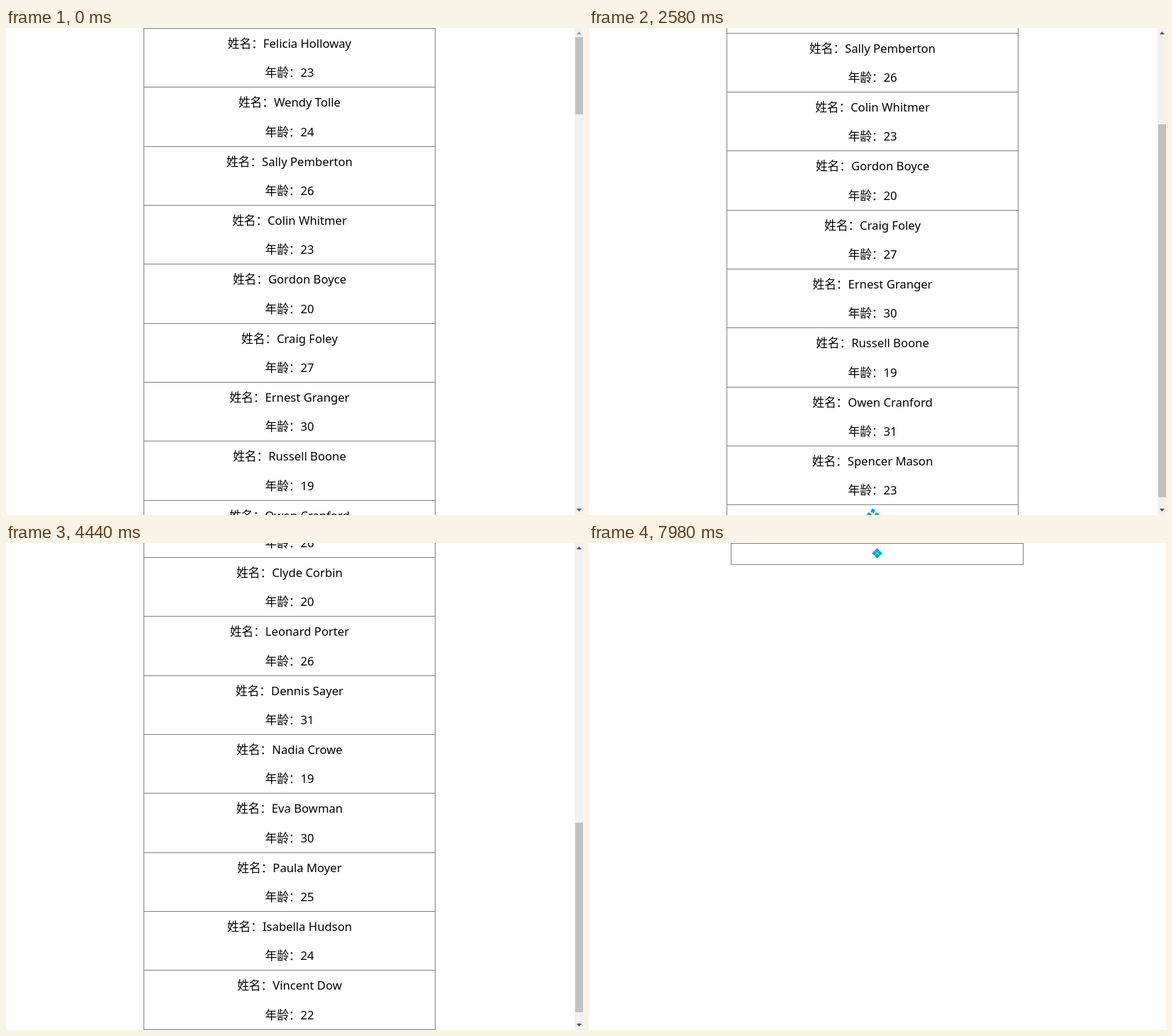
Recreate the animation shown at these times as an HTML page. Size 814 by 688 pixels, loop 8 s.

```html
<!DOCTYPE html>
<html lang="zh-CN">
<head>
<meta charset="utf-8">
<style>
html, body { margin: 0; width: 100%; height: 100%; overflow: hidden; background: #fff; }
body { position: relative; font: 16.67px/41.3px "Noto Sans", "Noto Sans CJK SC", "Noto Sans CJK", sans-serif; color: #000; }
div { box-sizing: border-box; position: absolute; }
.item, #loader { border: 1px solid #808080; }
.item { left: 194px; width: 412px; height: 84.33px; text-align: center; white-space: pre; }
#loader { height: 31px; overflow: hidden; }
#loader div { left: 50%; top: 13px; width: 5px; height: 5px; margin: -2.5px; background: #00a6d0; }
#bar { left: 802px; top: 0; width: 12px; height: 688px; background: #f1f1f1; }
#thumb { left: 1px; width: 11px; background: #c1c1c1; }
.arrow { left: 3px; width: 7px; height: 4px; background: #505050; }
#up { top: 5px; clip-path: polygon(50% 0, 100% 100%, 0 100%); }
#down { top: 679px; clip-path: polygon(0 0, 100% 0, 50% 100%); }
#status { left: 0; top: 670px; width: 269px; height: 18px; padding-left: 3px; background: #dee1e6;
  border: solid #c3c6cb; border-width: 1px 1px 0 0; border-top-right-radius: 3px;
  font-size: 9px; line-height: 17px; color: #5f6368; white-space: pre; }
</style>
</head>
<body>
<div id="list"></div>
<div id="loader"><div></div><div></div><div></div><div></div></div>
<div id="bar"><div id="thumb"></div><div class="arrow" id="up"></div><div class="arrow" id="down"></div></div>
<div id="status"></div>
<script>
const $ = id => document.getElementById(id);
const PITCH = 250 / 3, VIEW = 688, LOADER = 31.33, LOOP = 8000, STEP = 60;
const people = `Felicia Holloway 23,Wendy Tolle 24,Sally Pemberton 26,Colin Whitmer 23,Gordon Boyce 20,
Craig Foley 27,Ernest Granger 30,Russell Boone 19,Owen Cranford 31,Spencer Mason 23,
Gloria Stanhope 28,Roger Kimball 26,Clyde Corbin 20,Leonard Porter 26,Dennis Sayer 31,
Nadia Crowe 19,Eva Bowman 30,Paula Moyer 25,Isabella Hudson 24,Vincent Dow 22`.split(/,\s*/);

const items = people.map(person => {
  const el = document.createElement('div');
  const cut = person.lastIndexOf(' ');
  el.className = 'item';
  el.textContent = `姓名：${person.slice(0, cut)}\n年龄：${person.slice(cut + 1)}`;
  $('list').append(el);
  return el;
});
const squares = [...$('loader').children];

// [time, scroll offset]
const scrollKeys = [
  [2340, 0], [2400, 12], [2460, 60], [2520, 120], [2580, 160], [2640, 174], [2700, 176.67],
  [3840, 176.67], [3900, 260], [3960, 420], [4020, 540], [4080, 577],
  [4200, 577], [4260, 680], [4320, 850], [4380, 950], [4440, 980],
  [4740, 980], [4800, 930], [4860, 800], [4920, 640], [4980, 577],
  [5040, 577], [5100, 380], [5160, 130], [5220, 0]
];

function scrollAt(t) {
  const i = scrollKeys.findIndex(k => k[0] > t);
  if (i < 1) return 0;
  const [t0, a] = scrollKeys[i - 1], [t1, b] = scrollKeys[i];
  return a + (b - a) * (t - t0) / (t1 - t0);
}

// number of loaded entries and whether the loader follows them
function pageAt(t) {
  if (t < 1200) return [50, false];
  if (t < 2280) return [0, true];
  if (t < 3660) return [10, true];
  if (t < 4800) return [20, true];
  if (t < 7260) return [20, false];
  return [0, true];
}

function statusAt(t) {
  if (t >= 1020 && t < 1200) return '正在等待 localhost 的响应...';
  if (t >= 780 && t < 1020 || t >= 6960 && t < 7260) return '正在连接...';
  return '';
}

function drawSpinner(age) {
  const p = age / 735 % 1;
  const dist = 3.5 + 5 * Math.sin(Math.PI * p);
  squares.forEach((el, i) => {
    const x = dist * [0, 1, 0, -1][i], y = dist * [-1, 0, 1, 0][i];
    el.style.transform = `translate(${x}px, ${y}px) rotate(${45 + 180 * p}deg)`;
  });
}

function show(el, on) { el.style.display = on ? '' : 'none'; }

function draw(t) {
  const [count, loading] = pageAt(t);
  const scroll = scrollAt(t);
  const height = count * PITCH + (loading ? LOADER : 0);

  items.forEach((el, i) => {
    show(el, i < count);
    el.style.top = i * PITCH - scroll + 'px';
  });

  const loader = $('loader').style;
  show($('loader'), loading);
  loader.top = count * PITCH - scroll + 'px';
  loader.left = count ? '194px' : '200px';
  loader.width = count ? '412px' : '413px';
  drawSpinner(t - (t < 7260 ? 1200 : 7260));

  show($('bar'), count);
  const ratio = 662.5 / height;
  $('thumb').style.top = Math.round(12.75 + scroll * ratio + .3) + 'px';
  $('thumb').style.height = Math.round(VIEW * ratio) + 'px';
  $('up').style.background = scroll ? '#505050' : '#a3a3a3';

  const text = statusAt(t);
  show($('status'), text);
  $('status').textContent = text;
}

const start = performance.now();
function tick() {
  const t = (performance.now() - start) % LOOP;
  draw(Math.floor(t / STEP) * STEP);
  requestAnimationFrame(tick);
}
tick();
</script>
</body>
</html>
```
